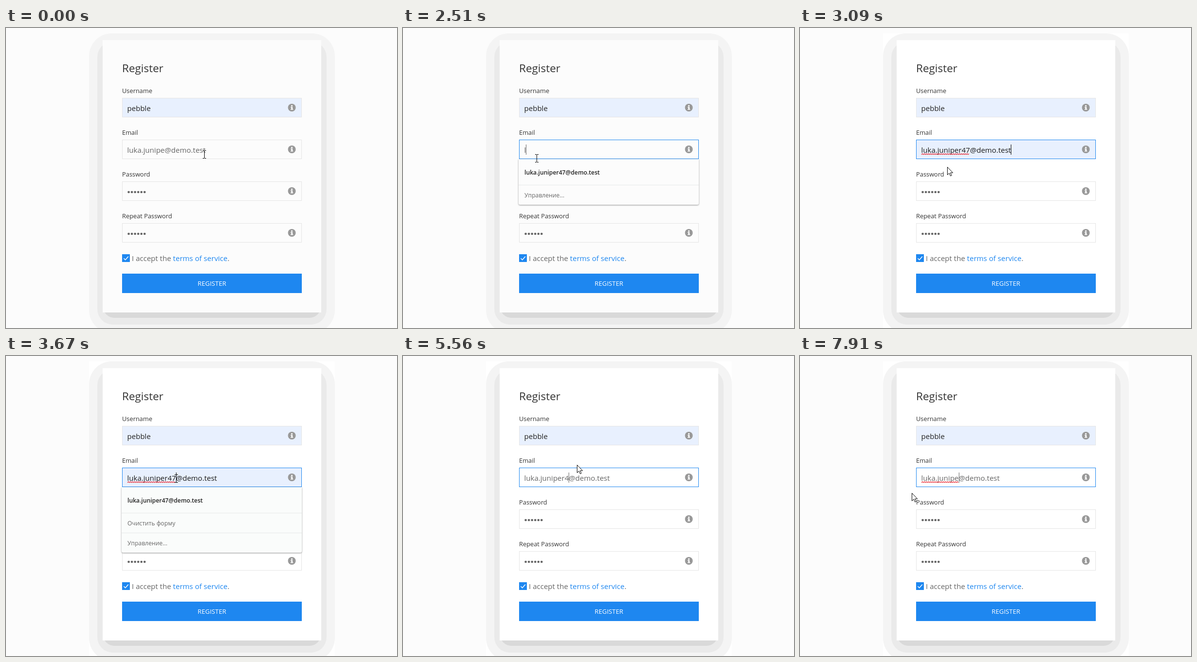
An HTML page with a canvas for the animation above (8 s loop, 805 px wide and 618 px high).

```html
<!DOCTYPE html>
<html lang="en">
<head>
<meta charset="utf-8">
<title>Register form</title>
<style>
html, body { margin: 0; width: 100%; height: 100%; overflow: hidden; background: #fcfcfc; }
canvas { display: block; }
</style>
</head>
<body>
<canvas id="stage" width="805" height="618"></canvas>
<script>
const ctx = document.getElementById('stage').getContext('2d');
const LOOP = 8000;
const FAMILY = '"Open Sans", "Noto Sans", sans-serif';
const BLUE = '#1e87f0', GREY = '#666', DARK = '#333', LINE = '#e5e5e5';
const INPUT = '15.05px', LABEL = '12.85px', MENU = '12.2px';
const LEFT = 239, WIDTH = 370, TEXT_X = 249.5;

const HOST = '@demo.test';
const SHORT = 'luka.junipe' + HOST;
const FULL = 'luka.juniper47' + HOST;

const ibeam = (x, y) => ({ kind: 'ibeam', x, y });
const arrow = (x, y) => ({ kind: 'arrow', x, y });

// Each step changes part of the state and holds until the next one.
const steps = [
  [0, { text: SHORT, focus: false, filled: false, white: false, caret: -1, sel: -1,
        squiggle: false, menu: 0, hover: false, pointer: ibeam(408, 260) }],
  [150, { pointer: ibeam(416, 258) }],
  [300, { focus: true, caret: SHORT.length, squiggle: true, pointer: ibeam(416, 256) }],
  [440, { caret: -1, sel: 18, pointer: ibeam(392, 255) }],
  [590, { sel: 13, pointer: ibeam(354, 253) }],
  [720, { sel: 10, pointer: ibeam(321, 252) }],
  [870, { sel: 8, pointer: ibeam(302, 251) }],
  [1010, { sel: 6, pointer: ibeam(287, 251) }],
  [1160, { sel: 5, pointer: ibeam(276, 251) }],
  [1310, { sel: 2, pointer: ibeam(261, 252) }],
  [1460, { sel: 0, pointer: ibeam(240, 256) }],
  [1610, { pointer: ibeam(256, 261) }],
  [1760, { pointer: ibeam(274, 265) }],
  [2200, { text: 'l', sel: -1, caret: 1, squiggle: false, menu: 2, pointer: ibeam(275, 268) }],
  [2650, { hover: true, pointer: arrow(281, 282) }],
  [2800, { text: FULL, filled: true, caret: -1, pointer: arrow(298, 292) }],
  [2940, { menu: 0, hover: false, white: true, caret: FULL.length, squiggle: true,
           pointer: arrow(302, 290) }],
  [3090, { pointer: arrow(303, 286) }],
  [3240, { pointer: ibeam(340, 258) }],
  [3370, { caret: 14, menu: 3, pointer: ibeam(350, 252) }],
  [4260, { caret: -1, squiggle: false, pointer: ibeam(353, 247) }],
  [4410, { pointer: ibeam(356, 240) }],
  [4540, { pointer: arrow(357, 229) }],
  [4680, { caret: 14, squiggle: true, pointer: arrow(358, 225) }],
  [5270, { caret: -1, squiggle: false }],
  [5560, { text: 'luka.juniper4' + HOST, filled: false, menu: 0, caret: 13,
           pointer: arrow(358, 224) }],
  [5840, { text: 'luka.juniper' + HOST, caret: 12 }],
  [6160, { text: SHORT, caret: 11, pointer: arrow(358, 223) }],
  [6310, { caret: -1 }],
  [6900, { caret: 11 }],
  [7200, { squiggle: true, pointer: arrow(350, 236) }],
  [7340, { pointer: arrow(326, 276) }],
  [7480, { caret: -1, pointer: arrow(294, 306) }],
  [7620, { pointer: arrow(262, 308) }],
  [7760, { pointer: arrow(240, 294) }],
  [7910, { caret: 11, pointer: arrow(230, 282) }]
];

function stateAt(time) {
  return Object.assign({}, ...steps.filter(s => s[0] <= time).map(s => s[1]));
}

function rect(x, y, w, h, color) {
  ctx.fillStyle = color;
  ctx.fillRect(x, y, w, h);
}

function rounded(x, y, w, h, r, color) {
  ctx.fillStyle = color;
  ctx.beginPath();
  ctx.roundRect(x, y, w, h, r);
  ctx.fill();
}

function setFont(size, weight = 400) {
  ctx.font = `${weight} ${size} ${FAMILY}`;
}

function write(text, x, y, size, color, weight) {
  setFont(size, weight);
  ctx.fillStyle = color;
  ctx.fillText(text, x, y);
  return x + ctx.measureText(text).width;
}

function stroke(points, color, width) {
  ctx.strokeStyle = color;
  ctx.lineWidth = width;
  ctx.beginPath();
  points.forEach(([x, y]) => ctx.lineTo(x, y));
  ctx.stroke();
}

function drawCard(white) {
  rect(0, 0, 805, 618, '#fcfcfc');
  if (white) rect(171, 11, 506, 607, '#fff');
  rounded(171, 11, 506, 617, 47, '#f4f4f4');
  rounded(188, 28, 472, 583, 32, '#eaeaea');
  rounded(200, 42, 448, 555, 23, '#d9d9d9');
  rect(199, 25, 450, 561, white ? '#fff' : '#fcfcfc');
}

function drawInfo(y) {
  ctx.fillStyle = '#999';
  ctx.beginPath();
  ctx.arc(588.5, y, 8, 0, Math.PI * 2);
  ctx.fill();
  rect(587, y - 5, 3, 2.4, '#fff');
  rect(586, y - 1.5, 4, 1.6, '#fff');
  rect(587.4, y - 1.5, 2.6, 5, '#fff');
  rect(586, y + 2.8, 5.2, 1.6, '#fff');
}

function drawField(label, y, border, fill) {
  write(label, LEFT, y - 10, LABEL, DARK);
  rect(LEFT, y, WIDTH, 40, border);
  rect(LEFT + 1, y + 1, WIDTH - 2, 38, fill);
  drawInfo(y + 20);
}

function drawDots(y) {
  ctx.fillStyle = GREY;
  for (let i = 0; i < 6; i++) {
    ctx.beginPath();
    ctx.arc(252.6 + i * 6.55, y, 2.35, 0, Math.PI * 2);
    ctx.fill();
  }
}

function drawEmail(s) {
  const color = s.filled ? '#1a1a1a' : GREY;
  const end = write(s.text, TEXT_X, 257, INPUT, color);
  const xAt = n => TEXT_X + ctx.measureText(s.text.slice(0, n)).width;

  if (s.sel >= 0) {
    const x = Math.round(xAt(s.sel));
    rect(x, 240, end - x, 22, '#3399ff');
    ctx.save();
    ctx.beginPath();
    ctx.rect(x, 240, end - x, 22);
    ctx.clip();
    write(s.text, TEXT_X, 257, INPUT, '#fff');
    ctx.restore();
  }
  if (s.squiggle) {
    const points = [];
    const stop = xAt(s.text.indexOf('@'));
    for (let x = 250; x <= stop; x += 2) points.push([x, x % 4 === 2 ? 260.8 : 258.8]);
    stroke(points, '#e8202a', 1.1);
  }
  if (s.caret >= 0) rect(Math.round(xAt(s.caret)), 240, 1, 21, s.filled ? '#000' : GREY);
}

function drawMenu(rows, hover, white) {
  const bottom = rows === 3 ? 405 : 364;
  ctx.save();
  ctx.shadowColor = 'rgba(0,0,0,.42)';
  ctx.shadowBlur = 3;
  ctx.shadowOffsetY = 1;
  rounded(238, 270, 371, bottom - 270, [0, 0, 3, 3], white ? '#fafcfb' : '#fcfcfc');
  ctx.restore();
  if (hover) rect(238, 271, 371, 52, '#eeeeee');
  write(FULL, 250, 302, MENU, '#222', 600);
  const items = rows === 3 ? ['Очистить форму', 'Управление...'] : ['Управление...'];
  items.forEach((item, i) => {
    rect(238, 323 + i * 41, 371, 1, '#e6e8e8');
    write(item, 250, 349 + i * 41, MENU, GREY);
  });
}

function drawPointer({ kind, x, y }) {
  if (kind === 'ibeam') {
    rect(x, y - 7, 1, 15, '#000');
    for (const end of [y - 8, y + 8]) {
      rect(x - 3, end, 3, 1, '#000');
      rect(x + 1, end, 3, 1, '#000');
    }
    return;
  }
  const shape = [[0, 0], [0, 16], [3.7, 12.6], [6.3, 18.3], [8.7, 17.2], [6.2, 11.7], [11.2, 11.7]];
  ctx.beginPath();
  shape.forEach(([dx, dy]) => ctx.lineTo(x + 0.5 + dx, y + 0.5 + dy));
  ctx.closePath();
  ctx.fillStyle = '#fff';
  ctx.fill();
  ctx.strokeStyle = '#000';
  ctx.lineWidth = 1;
  ctx.stroke();
}

function drawTerms() {
  rect(LEFT, 466, 16, 16, BLUE);
  stroke([[242.5, 474.5], [245.7, 477.7], [251.8, 470.8]], '#fff', 1.6);
  let x = write('I accept the ', 259, 480, '15.1px', GREY);
  x = write('terms of service', x, 480, '15.1px', BLUE);
  write('.', x, 480, '15.1px', GREY);
}

function drawButton() {
  rect(LEFT, 506, WIDTH, 40, BLUE);
  ctx.textAlign = 'center';
  write('REGISTER', 424, 531, '13.2px', '#fff');
  ctx.textAlign = 'left';
}

function draw(s) {
  const plain = s.white ? '#fff' : '#fcfcfc';
  drawCard(s.white);
  write('Register', LEFT, 91, '22.5px', DARK);
  drawField('Username', 144, LINE, '#e8f0fe');
  write('pebble', TEXT_X, 171, INPUT, '#222');
  drawField('Email', 230, s.focus ? BLUE : LINE, s.filled ? '#e8f0fe' : plain);
  drawEmail(s);
  drawField('Password', 316, LINE, plain);
  drawDots(338);
  drawField('Repeat Password', 402, LINE, plain);
  drawDots(424);
  drawTerms();
  drawButton();
  if (s.menu) drawMenu(s.menu, s.hover, s.white);
  drawPointer(s.pointer);
}

const start = performance.now();
function tick() {
  draw(stateAt((performance.now() - start) % LOOP));
  requestAnimationFrame(tick);
}
tick();
</script>
</body>
</html>
```
